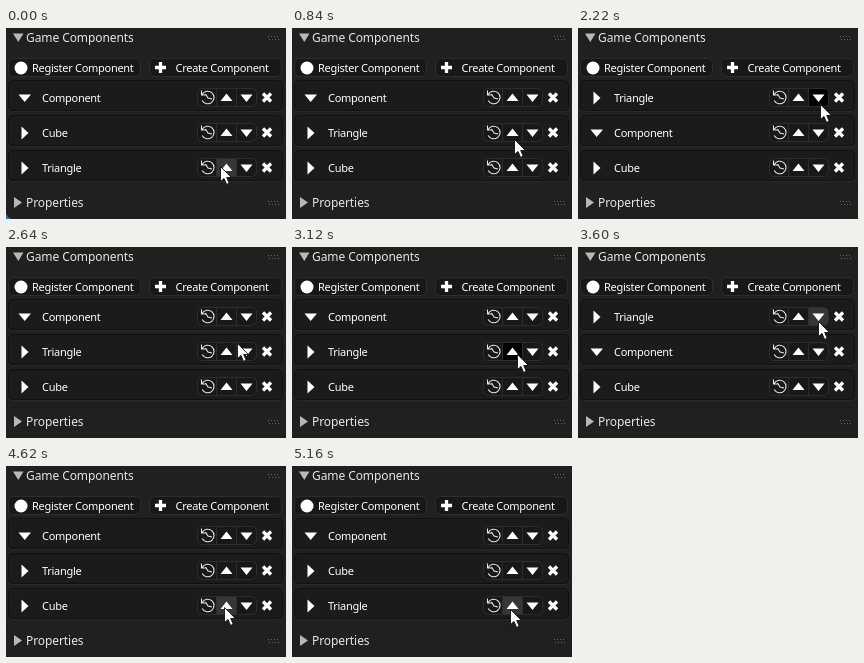
Recreate the animation shown at these times as an HTML page. Size 280x191 px, loop 5.34 s.

```html
<!DOCTYPE html>
<html lang="en">
<head>
<meta charset="utf-8">
<title>Game Components</title>
<style>
  html, body { margin: 0; height: 100%; overflow: hidden; background: #202020; }
  svg { display: block; fill: #fff; }
  text { font: 11px "Noto Sans", sans-serif; letter-spacing: -.28px; white-space: pre; }
  .title { font-size: 12px; letter-spacing: -.08px; fill: #e6e6e6; }
  .box { fill: #1b1b1b; stroke: #101010; }
  .button { fill: #181818; stroke: #2d2d2d; }
  .line { fill: none; stroke: #e8e8e8; stroke-width: 1.1; }
  .bold { fill: none; stroke: #fff; stroke-width: 3.3; }
  .dim { fill: #b8b8b8; }
</style>
</head>
<body>
<svg id="stage" width="280" height="191" viewBox="0 0 280 191"></svg>
<script>
const LOOP = 5340, STEP = 60, HOLD = 120;
const ROW_TOP = 52, ROW_GAP = 35, COLUMN_SPLIT = 231;
const names = { C: 'Component', U: 'Cube', T: 'Triangle' };

// Where the pointer rests; a press there clicks the button below it
const stops = [
  { x: 214, y: 138, arrive: 0 },
  { x: 217, y: 141, arrive: 180, press: 420 },
  { x: 224, y: 102, arrive: 1080, press: 1320 },
  { x: 242, y: 76, arrive: 1740, press: 2220 },
  { x: 225, y: 107, arrive: 3000, press: 3120 },
  { x: 240, y: 74, arrive: 3600, press: 3720 },
  { x: 218, y: 141, arrive: 4680, press: 4800 },
  { x: 218, y: 143, arrive: 5160 }
];
const clicks = stops.filter(s => s.press);

const rowY = i => ROW_TOP + i * ROW_GAP;
const rowAt = y => Math.floor((y - ROW_TOP) / ROW_GAP);
const part = id => document.getElementById(id);

const grip = y => Array.from({ length: 8 }, (_, i) => {
  const column = i % 4, row = i >> 2;
  return `<rect x="${262 + column * 3 + row}" y="${y + row * 3}" width="1" height="1" fill="#666"/>`;
}).join('');

const rowFrame = i => `<g transform="translate(0 ${rowY(i)})">
  <path d="M6 31.5H274" stroke="#2a2a2a"/>
  <rect class="box" x="2.5" y=".5" width="274" height="30" rx="5"/>
  <rect class="button" x="191.5" y="8.5" width="59" height="18" rx="5"/>
  <rect id="up${i}" x="211" y="9" width="19" height="17"/>
  <path id="down${i}" d="M231 9H246Q250 9 250 13V22Q250 26 246 26H231Z"/>
  <path d="M210.5 9V26M230.5 9V26" stroke="#2d2d2d"/>
  <path class="line" d="M196.2 14.5A6.3 6.3 0 1 1 196.2 20.5M195.5 10.5V15H200M199.5 14L202 18L206 19"/>
  <path d="M214.5 21L220.5 13.5L226.5 21ZM234.5 14.5L240.5 22L246.5 14.5Z"/>
  <path class="bold" d="M257 13.5L265 21.5M265 13.5L257 21.5"/>
</g>`;

const rowLabel = key => `<g id="${key}">
  <path d="${key === 'C' ? 'M12.5 14.5H25L18.7 22Z' : 'M15.5 11.5V24.5L22.5 18Z'}"/>
  <text x="36" y="22">${names[key]}</text>
</g>`;

part('stage').innerHTML = `
  <rect width="280" height="191" fill="#202020"/>
  <path d="M0 160.5H280" stroke="#1c1c1c"/>
  <path id="corner" d="M0 185Q1 190 6 191H0Z" fill="#2b78b0"/>
  <path class="dim" d="M7 5.5H17.5L12.3 14ZM8 169V180L16 174.5Z"/>
  <text class="title" x="20" y="14">Game Components</text>
  <text class="title" x="20" y="179">Properties</text>
  ${grip(8)}${grip(173)}
  <rect class="button" x="2.5" y="30.5" width="132" height="18" rx="5"/>
  <rect class="button" x="143.5" y="30.5" width="132" height="18" rx="5"/>
  <circle cx="15" cy="40" r="6.5"/>
  <path class="bold" d="M149 39.5H160M154.5 34V45"/>
  <text x="26" y="44">Register Component</text>
  <text x="169.5" y="44">Create Component</text>
  ${[0, 1, 2].map(rowFrame).join('')}
  ${Object.keys(names).map(rowLabel).join('')}
  <path id="pointer" d="M.5 .5V15.6L4 12.4L6.6 18.4L9.2 17.2L6.7 11.5H11.4Z"
    fill="#fff" stroke="#111" stroke-width=".9"/>`;

function pointerAt(t) {
  const from = stops.filter(s => s.arrive <= t).pop();
  const to = stops.find(s => s.arrive > t) || from;
  const leave = from.press ? from.press + HOLD : from.arrive;
  const k = t > leave && to !== from ? (t - leave) / (to.arrive - leave) : 0;
  const mix = (a, b) => Math.round(a + (b - a) * Math.sin(k * Math.PI / 2));
  return { x: mix(from.x, to.x), y: mix(from.y, to.y) };
}

// Each released click swaps its row with the one above or below
function orderAt(t) {
  const order = ['C', 'U', 'T'];
  for (const { x, y, press } of clicks) {
    if (t < press + HOLD) break;
    const row = rowAt(y), other = row + (x < COLUMN_SPLIT ? -1 : 1);
    [order[row], order[other]] = [order[other], order[row]];
  }
  return order;
}

function draw(t) {
  const pointer = pointerAt(t);
  const hover = pointerAt((t - STEP + LOOP) % LOOP); // highlight trails the pointer
  const pressed = clicks.some(c => t >= c.press && t < c.press + HOLD);

  orderAt(t).forEach((key, i) => {
    part(key).setAttribute('transform', `translate(0 ${rowY(i)})`);
    const top = rowY(i) + 8;
    const inside = hover.y >= top && hover.y < top + 19;
    const left = hover.x < COLUMN_SPLIT;
    const fill = on => on ? (pressed ? '#000' : '#363636') : 'none';
    part('up' + i).setAttribute('fill', fill(inside && left));
    part('down' + i).setAttribute('fill', fill(inside && !left));
  });
  part('pointer').setAttribute('transform', `translate(${pointer.x} ${pointer.y})`);
  part('corner').setAttribute('visibility', t < clicks[0].press + HOLD ? 'visible' : 'hidden');
}

function tick() {
  const t = performance.now() % LOOP;
  draw(Math.floor(t / STEP) * STEP);
  requestAnimationFrame(tick);
}
tick();
</script>
</body>
</html>
```
